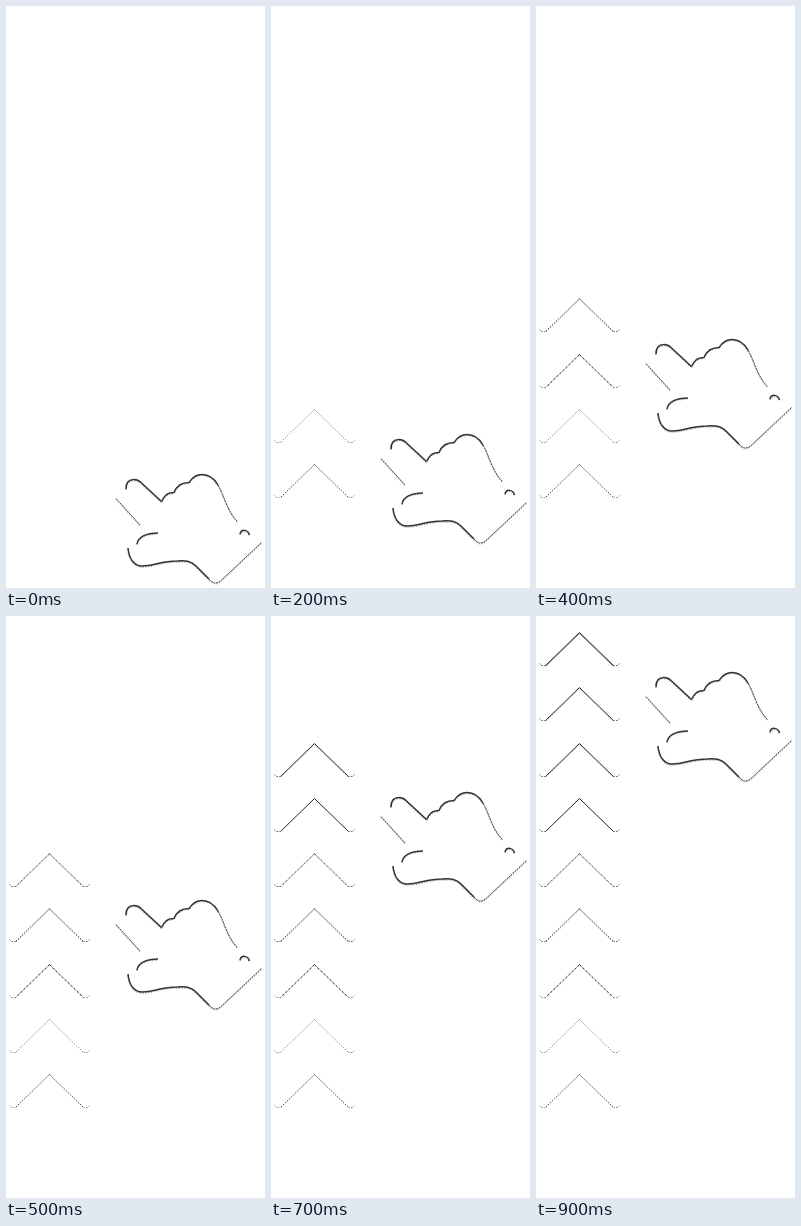
Animation, 259 px wide and 582 px high, one loop 1 s. Source, as an HTML page:

```html
<!DOCTYPE html>
<html lang="en">
<head>
<meta charset="utf-8">
<title>Swipe up</title>
<style>
html, body { margin: 0; width: 100%; height: 100%; overflow: hidden; background: #fff; }
svg { display: block; width: 259px; height: 582px; }
path { fill: none; stroke-linejoin: round; }
</style>
</head>
<body>
<svg id="stage" viewBox="0 0 259 582">
  <g id="arrows"></g>
  <g id="hand"></g>
</svg>
<script>
const LOOP = 1000, STEPS = 10;
const arrows = document.getElementById('arrows');
const hand = document.getElementById('hand');

function add(parent, tag, attrs) {
  const el = document.createElementNS('http://www.w3.org/2000/svg', tag);
  for (const k in attrs) el.setAttribute(k, attrs[k]);
  return parent.appendChild(el);
}

function line(parent, d, color, width, dash, dy) {
  return add(parent, 'path', {
    d, stroke: color, 'stroke-width': width,
    'stroke-dasharray': dash || 'none', transform: `translate(0 ${dy || 0})`
  });
}

function play(el, frames) {
  el.animate(frames.map(f => ({ easing: 'steps(1, end)', ...f })),
    { duration: LOOP, iterations: Infinity });
}

// Arrow styles from bottom to top: [colour, dash, colour of lower edge, its dash]
const styles = [
  ['#333', '1.41 1.41'],
  ['#777', '1.2 1.63'],
  ['#333', '2.8 1.41', '#bbb', '1.41 2.8'],
  ['#444', '1.41 1.41', '#999', '1.41 1.41'],
  ['#666', '2.8 1.41', '#aaa', '1.41 1.41'],
  ['#222', ''],
  ['#333', '', '#999', '1.41 1.41'],
  ['#333', '', '#888', '1.41 1.41'],
  ['#2a2a2a', '', '#888', '']
];
const slope = 'M43.5 .5L9.5 33.5M43.5 .5L77.5 33.5';
const feet = 'M3.5 31.5L5.5 33.5H9.5M83.5 31.5L81.5 33.5H77.5';

styles.forEach(([color, dash, edge, edgeDash], i) => {
  const y = Math.round(458 - 55.25 * i);
  const g = add(arrows, 'g', { transform: `translate(0 ${y})` });
  if (edge) line(g, slope, edge, 1, edgeDash, 1);
  line(g, slope, color, 1, dash);
  line(g, feet, i < 3 ? '#888' : '#555', 1, '1.41 1.41');
  play(g, [
    { offset: 0, opacity: 0 },
    { offset: (i + 1) / STEPS, opacity: 1 },
    { offset: 1, opacity: 1 }
  ]);
});

// Hand outline: [path, heavy stroke]
const parts = [
  ['M120 483C120 477 123 473.5 128 473.5C131 473.5 133 474.5 135 476.5L155.5 495.5', 1],
  ['M155.5 495.5C158 491 160 486.5 168 486.5C171 479 176 476.5 183 476.5C187 470.5 191 468.5 196 468.5C203 468.5 208 472 212 479', 1],
  ['M212 479C216 486 217 490 220 497C224 506 227 511 231.5 515.5', 0],
  ['M110 492.5L134.5 519.5', 0],
  ['M131 538C132 531 140 527 152 527', 1],
  ['M122 542C123 554 129 560 136 560C148 560 155 555 171 555C181 554.5 185 555 190 560L203 573', 1],
  ['M203 573C207 578 211 578 215 574.5L255.5 536.5', 0],
  ['M234 528C235 523 242 523 243.5 529', 1]
];
for (const [d, heavy] of parts) {
  line(hand, d, heavy ? '#aaa' : '#bbb', heavy ? 1.6 : 1.2, '1.41 1.41', 1);
  line(hand, d, heavy ? '#333' : '#444', heavy ? 1.5 : 1, heavy ? '' : '2.2 .6');
}

const lift = [0, 18, 40, 87, 135, 184, 235, 292, 350, 412];
play(hand, [...lift, 412].map((y, i) => ({
  offset: i / STEPS, transform: `translate(0px, ${-y}px)`
})));
</script>
</body>
</html>
```
